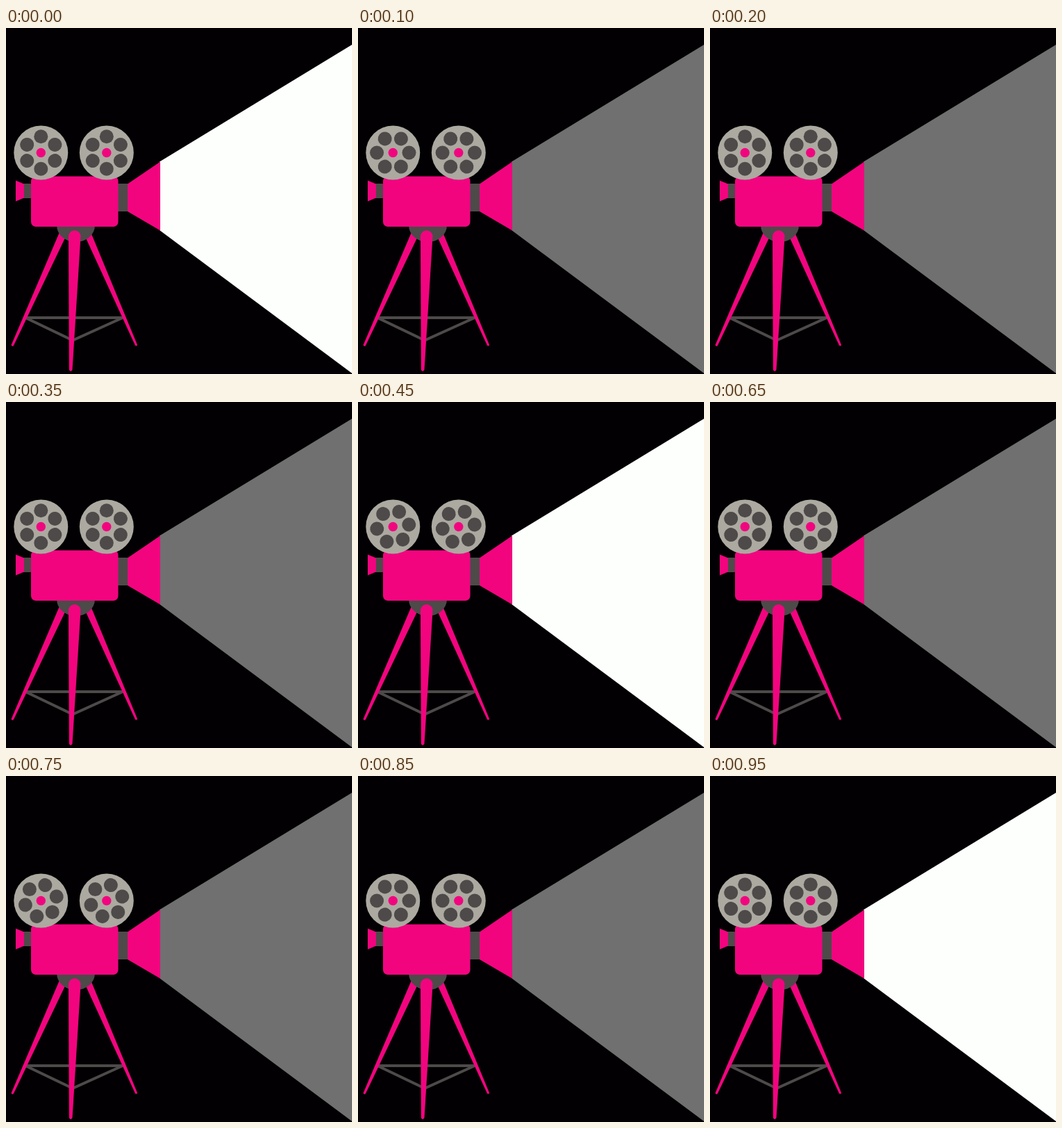
Animation, 498 px wide and 498 px high, one loop 1 s. Source, as an HTML page:

```html
<!DOCTYPE html>
<html lang="en">
<head>
<meta charset="utf-8">
<title>Film projector</title>
<style>
  html, body { margin: 0; width: 100%; height: 100%; overflow: hidden; background: #020003; }
  svg { display: block; width: 100vw; height: 100vh; }
  .pink { fill: #f2047f; }
  .dark { fill: #4d4a49; }
  .metal { fill: #aba9a0; }
</style>
</head>
<body>
<svg viewBox="0 0 498 498">
  <defs>
    <g id="holes" class="dark"></g>
  </defs>
  <rect width="498" height="498" fill="#020003"/>
  <path id="beam" d="M221 192.5L498 24V497L221 291Z"/>

  <!-- tripod -->
  <path d="M28 417H168L96 449.5Z" fill="none" stroke="#4d4a49" stroke-width="4"/>
  <path class="pink" d="M77 294L88 296L11 457Q9 459 7.5 456.5Z"/>
  <path class="pink" d="M112 296L122 294L189 456Q188 459 186 457Z"/>
  <path class="dark" d="M73 284A27.5 24 0 0 0 128 284Z"/>
  <path class="pink" d="M90 300A8.7 8.7 0 0 1 107.5 300L95.5 492Q93 496 90.8 492Z"/>

  <!-- camera -->
  <path class="dark" d="M25 224H37V245H25ZM160 224H176V264H160Z"/>
  <path class="pink" d="M14 219.5L26 224.5V244.5L14 249.5Z"/>
  <path class="pink" d="M175 224.5L222 192.5V291.5L175 264Z"/>
  <rect class="pink" x="36" y="213.5" width="125.5" height="72.5" rx="7"/>

  <g id="reels"></g>
</svg>
<script>
  const STEP = 50, STEPS = 20;
  const CENTERS = [50.3, 144.8], REEL_Y = 179.5;
  const GRAY = [112, 112, 112], WHITE = [253, 255, 252];
  // [step, degrees] along one loop
  const TURN = [[0, 0], [4, 60], [7, 120], [11, 165], [13, 180], [17, 210], [19, 240], [20, 240]];

  const byId = id => document.getElementById(id);
  const beam = byId('beam');

  byId('holes').innerHTML = Array.from({ length: 6 }, (_, i) =>
    `<circle cy="-23.2" r="10" transform="rotate(${i * 60})"/>`).join('');

  byId('reels').innerHTML = CENTERS.map(x =>
    `<g transform="translate(${x} ${REEL_Y})">
      <circle class="metal" r="39"/>
      <use class="spin" href="#holes"/>
      <circle class="pink" r="6.7"/>
    </g>`).join('');

  const spins = document.querySelectorAll('.spin');

  function angleAt(n) {
    const i = TURN.findIndex(([step]) => step > n);
    const [n0, a0] = TURN[i - 1], [n1, a1] = TURN[i];
    return a0 + (a1 - a0) * (n - n0) / (n1 - n0);
  }

  // Two flashes per loop, each fading over a couple of steps
  function glowAt(n) {
    const gap = Math.abs((n + 5.5) % 10 - 5);
    return Math.min(1, Math.max(0, (2.5 - gap) / 2));
  }

  function draw(ms) {
    const n = Math.floor(ms / STEP) % STEPS;
    const glow = glowAt(n);
    const color = GRAY.map((c, i) => Math.round(c + (WHITE[i] - c) * glow));
    beam.setAttribute('fill', `rgb(${color})`);
    spins.forEach(s => s.setAttribute('transform', `rotate(${angleAt(n)})`));
  }

  const start = performance.now();
  function tick() {
    draw(performance.now() - start);
    requestAnimationFrame(tick);
  }
  draw(0);
  requestAnimationFrame(tick);
</script>
</body>
</html>
```
